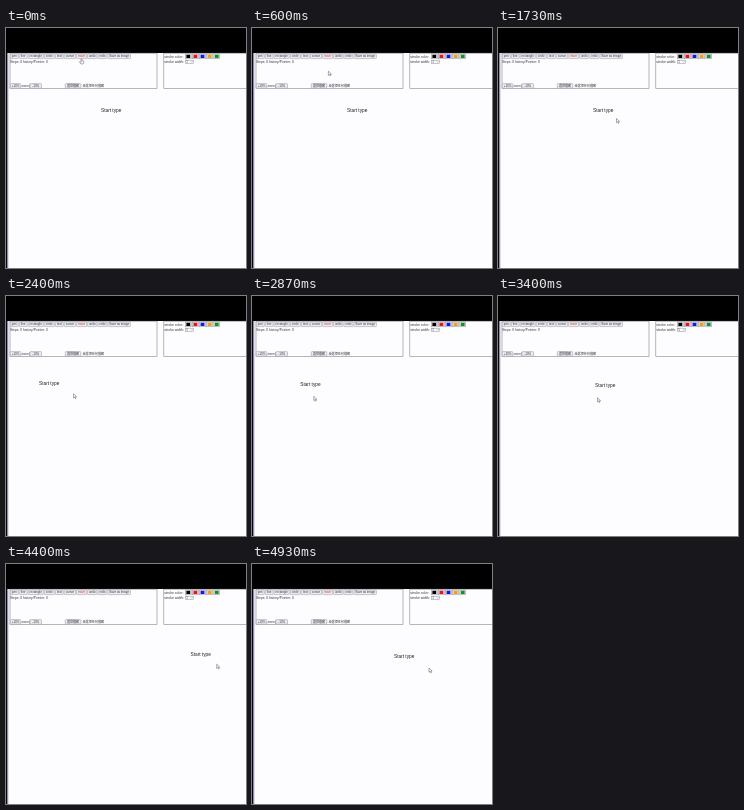
These frames come from a looping animation (240 by 240 pixels, 4990 ms). An HTML page:

```html
<!DOCTYPE html>
<html lang="en">
<head>
<meta charset="utf-8">
<title>Drawing board</title>
<style>
  html, body { margin: 0; width: 100%; height: 100%; overflow: hidden; background: #fdfdff; }
  svg { display: block; width: 100vw; height: 100vh; }
  text { font-family: "Liberation Sans", Arial, "Noto Sans CJK TC", "Noto Sans CJK", sans-serif; font-size: 3.3px; fill: #34343c; }
  .button rect { fill: #ececf2; stroke: #92929e; stroke-width: .5; }
  .button text { font-size: 3px; text-anchor: middle; }
  .button.active text { fill: #e02828; }
  .panel { fill: none; stroke: #85858d; stroke-width: .6; }
  #label { font-size: 4.75px; fill: #222; }
</style>
</head>
<body>
<svg viewBox="0 0 240 240">
  <rect width="240" height="240" fill="#fdfdff"/>
  <rect width="240" height="25" fill="#000"/>
  <rect y="25" width="1.6" height="215" fill="#08080c"/>
  <rect x="1.6" y="25" width="1" height="215" fill="#c9c9ea"/>
  <rect class="panel" x="4" y="25.2" width="147" height="35.3"/>
  <rect class="panel" x="157.8" y="25.2" width="86" height="35.3"/>
  <g id="tools"></g>
  <text x="4" y="34.7">Steps: 0 history/Pointer: 0</text>
  <text x="15.4" y="59.2" style="font-size:3px">zoom(</text>
  <text x="76.5" y="59.2" style="font-size:3.1px">未選擇任何檔案</text>
  <text x="158.3" y="29.9" style="font-size:3.5px">stroke color:</text>
  <text x="158.3" y="34.9" style="font-size:3.5px">stroke width:</text>
  <g id="swatches"></g>
  <rect x="179.5" y="32.2" width="8" height="3.4" fill="#fff" stroke="#8c8c94" stroke-width=".5"/>
  <text x="180.6" y="34.9" style="font-size:2.8px">5</text>
  <path d="M184.8 33.4l.9 .9 .9-.9" fill="none" stroke="#444" stroke-width=".4"/>
  <text id="label">Start type</text>
  <g id="cursor" fill="#fff" stroke="#55555f" stroke-width=".5" stroke-linejoin="round">
    <path id="arrow" d="M0 0v4.2l1-.9 .7 1.5 .8-.4-.7-1.4h1.3z"/>
    <path id="hand" d="M-.5 0h.9v1.7l1.7.4v1.6l-.6 1.2h-2.3l-1.4-2 .5-.4 1.2.7z"/>
  </g>
</svg>
<script>
  const LOOP = 4990, STEP = 200 / 3;
  const byId = id => document.getElementById(id);

  function addShape(parent, tag, attrs, text = "") {
    const node = document.createElementNS("http://www.w3.org/2000/svg", tag);
    for (const key in attrs) node.setAttribute(key, attrs[key]);
    node.textContent = text;
    return parent.appendChild(node);
  }

  function addButton(label, x, y, width, height = 4.6) {
    const group = addShape(byId("tools"), "g", { class: label === "move" ? "button active" : "button" });
    addShape(group, "rect", { x, y, width, height, rx: .7 });
    addShape(group, "text", { x: x + width / 2, y: y + 3.3 }, label);
  }

  let left = 4.3;
  [["pen", 8], ["line", 7.8], ["rectangle", 15.2], ["circle", 10], ["text", 8], ["cursor", 11.3],
   ["move", 10], ["undo", 9.3], ["redo", 9], ["Save as image", 22.5]].forEach(([label, width]) => {
    addButton(label, left, 26, width);
    left += width + 1;
  });
  addButton("+10%", 4.3, 55.6, 10.5);
  addButton("-10%", 24, 55.6, 11.5);
  addButton("選擇檔案", 59.3, 55.6, 15.5);

  ["#000", "#e81420", "#1818dc", "#f0a010", "#109428"].forEach((fill, i) => {
    const x = 179.4 + i * 7.1;
    addShape(byId("swatches"), "rect", { x, y: 26, width: 5.8, height: 4.8, fill: "#e9e9ef", stroke: "#8c8c98", "stroke-width": .5 });
    addShape(byId("swatches"), "rect", { x: x + 1, y: 26.8, width: 3.8, height: 3.2, fill });
  });

  // Each stop: time in ms, x, y
  const labelPath = [[0, 95, 83.6], [1830, 95, 83.6], [2400, 33, 89.1], [2700, 33, 89.1],
    [3400, 97, 91.4], [4400, 184.5, 91.5], [4930, 142, 94]];
  const cursorPath = [[0, 75.6, 31], [450, 75.6, 31], [1070, 78.7, 81], [1200, 78.7, 81],
    [1730, 118.5, 90.5], [1830, 118.5, 91], [2400, 67.5, 97.8], [2700, 50, 100],
    [3400, 99.5, 101.7], [4400, 210.7, 100.2], [4930, 177, 104]];

  function pointAt(path, time) {
    const next = path.findIndex(stop => stop[0] > time);
    if (next < 0) return path[path.length - 1].slice(1);
    const [t0, x0, y0] = path[next - 1], [t1, x1, y1] = path[next];
    const k = (time - t0) / (t1 - t0);
    return [x0 + (x1 - x0) * k, y0 + (y1 - y0) * k];
  }

  const place = (id, [x, y]) => byId(id).setAttribute("transform", `translate(${x} ${y})`);

  function draw(now) {
    const time = Math.floor((now % LOOP + 4) / STEP) * STEP;
    const pointer = pointAt(cursorPath, time);
    const overTools = pointer[1] < 33;
    place("label", pointAt(labelPath, time));
    place("cursor", pointer);
    byId("hand").style.display = overTools ? "" : "none";
    byId("arrow").style.display = overTools ? "none" : "";
  }

  const start = performance.now();
  function tick() {
    draw(performance.now() - start);
    requestAnimationFrame(tick);
  }
  tick();
</script>
</body>
</html>
```
